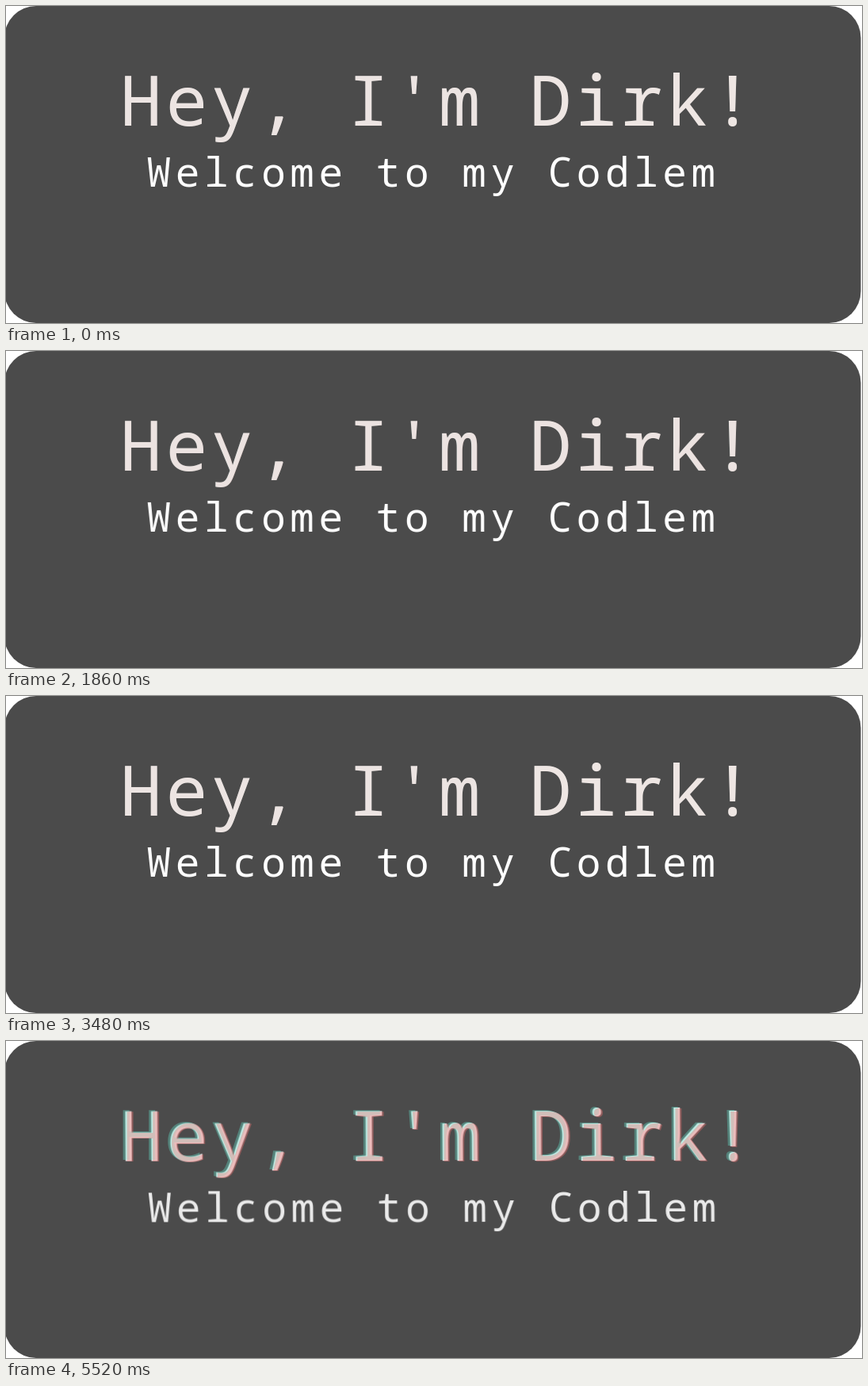
An HTML page that plays this animation: 1080 by 400 pixels, repeating every 5.55 s.

```html
<!DOCTYPE html>
<html lang="en">
<head>
<meta charset="utf-8">
<title>Greeting banner</title>
<style>
  html, body { margin: 0; width: 100%; height: 100%; overflow: hidden; background: #fff; }
  svg { display: block; width: 1080px; height: 400px; }
  text { font-family: "Noto Sans Mono", "DejaVu Sans Mono", monospace; white-space: pre; }
  .title { font-size: 88px; letter-spacing: 4.6px; }
  .sub { font-size: 51px; letter-spacing: 5.55px; }

  /* Paused: the script scrubs every layer through --t */
  .glitch {
    animation: 2250ms ease infinite paused;
    animation-delay: calc(var(--t, 1939) * -1ms);
  }
  .main { fill: #fff; transform-origin: 780px 40px; animation-name: skew; }
  .teal { fill: #67f3da; --dir: -1px; --rest: .12; --peak: .56; animation-name: shift; }
  .red { fill: #f16f6f; --dir: 1px; --rest: .17; --peak: .6; animation-name: shift; }

  @keyframes skew {
    0%, 10%, 27%, 35%, 52%, 72%, 80%, 100% { transform: skew(0deg, 0deg); opacity: 1; }
    7% { transform: skew(-.5deg, -.9deg); opacity: .75; }
    30% { transform: skew(.8deg, -.1deg); opacity: .75; }
    55% { transform: skew(-1deg, .2deg); opacity: .75; }
    75% { transform: skew(.4deg, 1deg); opacity: .75; }
  }
  @keyframes shift {
    0%, 10%, 27%, 35%, 52%, 72%, 80%, 100% { transform: translate(0px, 0px); opacity: var(--rest); }
    7% { transform: translate(calc(2 * var(--dir)), calc(3 * var(--dir))); opacity: var(--peak); }
    30% { transform: translate(calc(5 * var(--dir)), calc(2 * var(--dir))); opacity: var(--peak); }
    55% { transform: translate(calc(5 * var(--dir)), var(--dir)); opacity: var(--peak); }
    75% { transform: translate(calc(2 * var(--dir)), calc(6 * var(--dir))); opacity: var(--peak); }
  }
</style>
</head>
<body>
<svg viewBox="0 0 1080 400">
  <rect x="-2" width="1080.5" height="400" rx="40" fill="#4b4b4b"/>
  <g class="glitch main">
    <text class="title" x="144" y="151">Hey, I'm Dirk!</text>
    <text class="sub" x="177.6" y="228">Welcome to my Codlem</text>
  </g>
  <text class="title glitch teal" x="144" y="151" aria-hidden="true">Hey, I'm Dirk!</text>
  <text class="title glitch red" x="144" y="151" aria-hidden="true">Hey, I'm Dirk!</text>
</svg>
<script>
  const LOOP = 5550, STEP = 30, PHASE = 1939;
  const root = document.documentElement;

  function draw() {
    const t = Math.floor(performance.now() % LOOP / STEP) * STEP;
    root.style.setProperty('--t', PHASE + t);
    requestAnimationFrame(draw);
  }
  draw();
</script>
</body>
</html>
```
